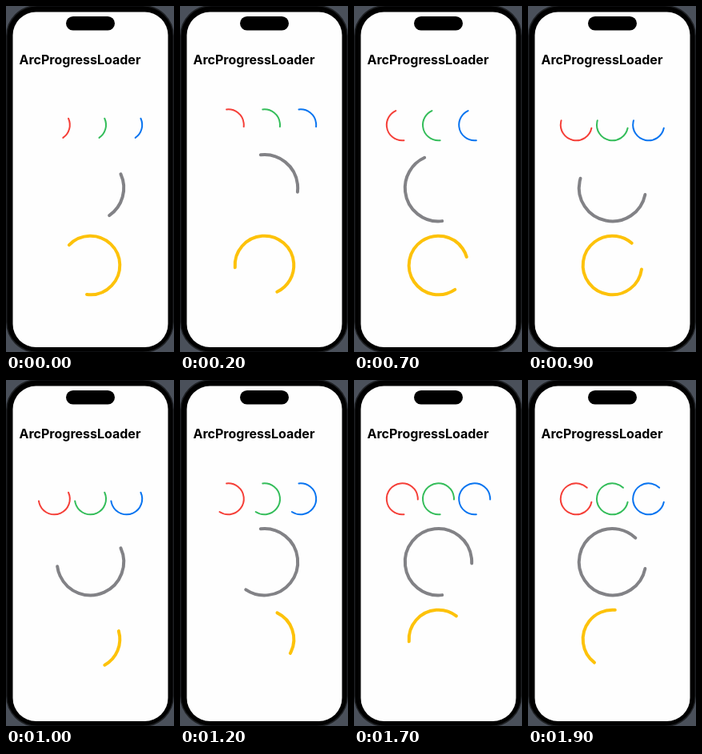
An HTML page that plays this animation: 210x433 px, repeating every 2 s.

```html
<!DOCTYPE html>
<html lang="en">
<head>
<meta charset="utf-8">
<title>ArcProgressLoader</title>
<style>
  html, body { margin: 0; width: 100%; height: 100%; overflow: hidden; background: #4a505a; }
  svg { display: block; width: 100%; height: 100%; }
  text { font: 700 16px Inter, "Liberation Sans", sans-serif; }
  .loader { fill: none; stroke-linecap: round; }
</style>
</head>
<body>
<svg id="stage" viewBox="0 0 210 433">
  <rect x=".75" y="-.25" width="208.5" height="433.5" rx="38" fill="#000" stroke="#1d1f22" stroke-width="1.5"/>
  <rect x="8.5" y="7.5" width="194" height="419.5" rx="29" fill="#fefefe"/>
  <rect x="75" y="13" width="61" height="17.5" rx="8.75" fill="#000"/>
  <text x="16.5" y="73">ArcProgressLoader</text>
</svg>
<script>
const LOOP = 2000, STEP = 100;
const LEAD = 68; // the loaders are already running when the loop begins
const MIN_ARC = 72, MAX_ARC = 306;

// spin: ms per turn, grow: ms from shortest to longest arc
const fast = { spin: 1000, grow: 2000, offset: LEAD };
const slow = { spin: 1500, grow: 3000, offset: LEAD + 2000 };

const loaders = [
  { x: 60.3, y: 148.8, r: 19.5, width: 2, color: "#f53f38", pace: fast },
  { x: 105.5, y: 148.8, r: 19.5, width: 2, color: "#34bd5a", pace: fast },
  { x: 150.7, y: 148.8, r: 19.5, width: 2, color: "#0874f0", pace: fast },
  { x: 105.5, y: 227.7, r: 41.7, width: 4, color: "#828286", pace: fast },
  { x: 105.5, y: 324.5, r: 36.8, width: 4, color: "#fdc20a", pace: slow },
];

const stage = document.getElementById("stage");

function createLoader({ x, y, r, width, color }) {
  const circle = document.createElementNS("http://www.w3.org/2000/svg", "circle");
  const attributes = {
    class: "loader", cx: x, cy: y, r, stroke: color, "stroke-width": width, pathLength: 360,
  };
  for (const [name, value] of Object.entries(attributes)) circle.setAttribute(name, value);
  return stage.appendChild(circle);
}

for (const loader of loaders) loader.node = createLoader(loader);

function draw(time) {
  for (const { x, y, pace, node } of loaders) {
    const elapsed = time + pace.offset;
    const growth = (elapsed % pace.grow) / pace.grow;
    const arc = MIN_ARC + (MAX_ARC - MIN_ARC) * growth;
    const angle = -360 * elapsed / pace.spin;
    node.setAttribute("stroke-dasharray", `${arc} ${360 - arc}`);
    node.setAttribute("transform", `rotate(${angle} ${x} ${y})`);
  }
}

const began = performance.now();

function tick() {
  const time = (performance.now() - began) % LOOP;
  draw(Math.floor(time / STEP) * STEP);
  requestAnimationFrame(tick);
}
tick();
</script>
</body>
</html>
```
